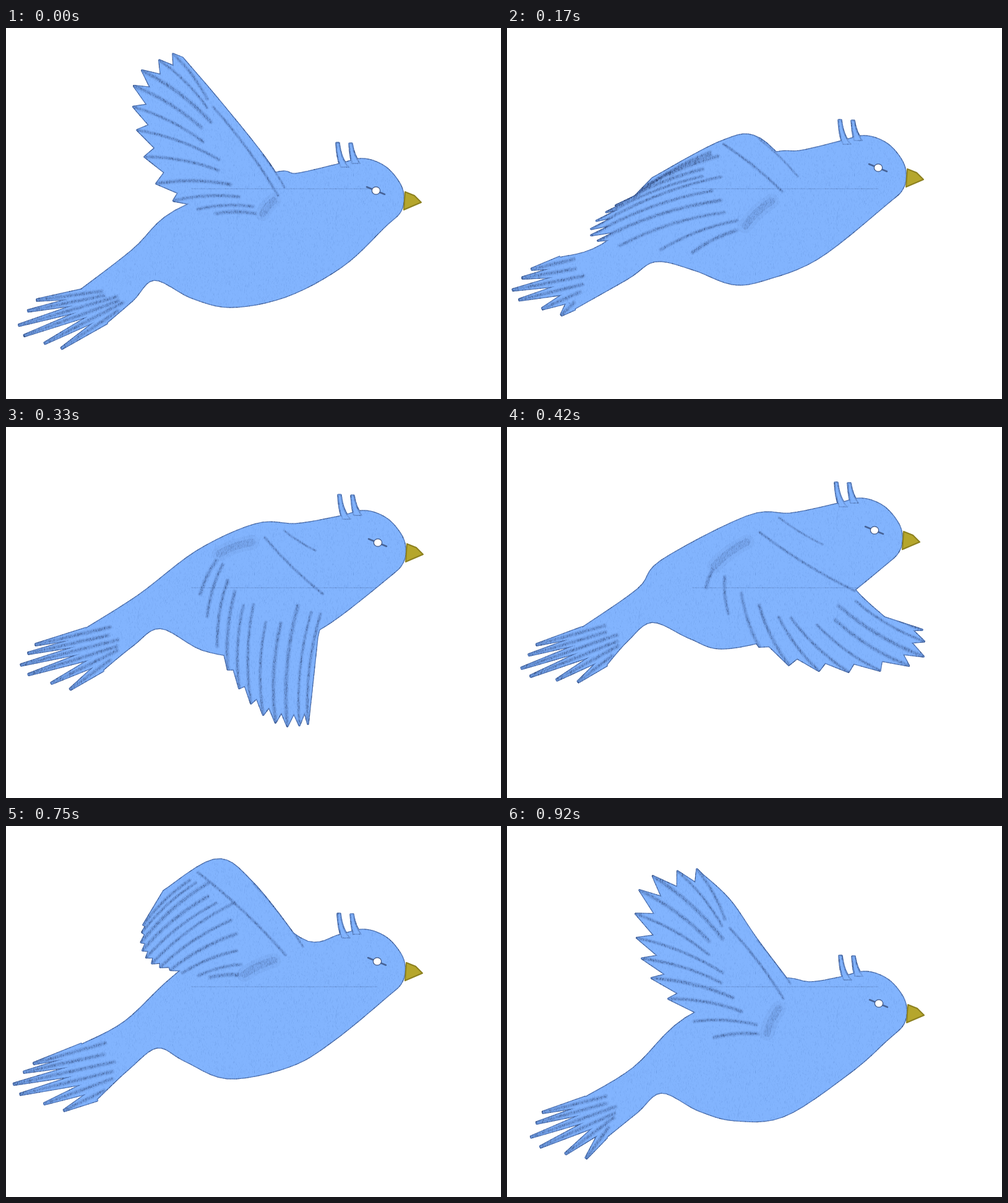
An HTML page with a canvas that plays this animation: 800x600 px, repeating every 1010 ms.

```html
<!DOCTYPE html>
<html lang="en">
<head>
<meta charset="utf-8">
<title>Flying bird</title>
<style>
html, body { margin: 0; width: 100%; height: 100%; overflow: hidden; background: #fff; }
canvas { display: block; width: 800px; height: 600px; }
</style>
</head>
<body>
<canvas id="stage" width="800" height="600"></canvas>
<script>
const W = 800, H = 600, LOOP = 1010;
const BLUE = '#82b4fe';
const FEATHERS = 11, TAIL_FEATHERS = 6;
const stage = document.getElementById('stage').getContext('2d');

// The head keeps its shape and travels with the eye.
const HEAD = [[-62, -42], [-22, -51], [12, -40], [35, -16], [44, 8], [39, 34], [14, 58]];
const BEAK = [[47, 2], [62, 8], [73, 19], [45, 31]];
const QUILLS = [[[-62, -77], [-51, -42]], [[-41, -76], [-33, -48]]];

// Key curves of each wing position. Feathers run from rim to shaft;
// cut is how deep the notches between them go.
const poses = [
  {
    eye: [598, 263], cut: 0.16,
    back: [[118, 426], [205, 359], [275, 295], [430, 236], [470, 236]],
    belly: [[545, 384], [455, 433], [365, 451], [300, 436], [240, 407], [205, 440], [163, 476]],
    tail: [[50, 440], [21, 490], [90, 518]],
    lead: [[450, 258], [415, 205], [345, 118], [285, 48]],
    rim: [[270, 42], [211, 80], [212, 165], [255, 268], [340, 300]],
    shaft: [[335, 128], [350, 215], [415, 300]]
  },
  {
    eye: [600, 226], cut: 0.16,
    back: [[85, 372], [155, 350], [270, 260], [420, 205], [475, 199]],
    belly: [[505, 371], [420, 406], [365, 414], [300, 390], [240, 377], [195, 405], [105, 456]],
    tail: [[40, 390], [10, 432], [88, 464]],
    lead: [[470, 240], [405, 177], [345, 184], [235, 243]],
    rim: [[205, 274], [168, 292], [136, 325], [160, 348], [300, 363]],
    shaft: [[350, 188], [355, 237], [385, 320]]
  },
  {
    eye: [601, 187], cut: 0.1,
    back: [[128, 327], [215, 272], [310, 200], [405, 157], [470, 157]],
    belly: [[530, 312], [470, 345], [400, 370], [320, 361], [250, 325], [205, 353], [155, 394]],
    tail: [[48, 352], [26, 393], [104, 424]],
    lead: [[450, 168], [500, 200], [516, 270], [503, 340]],
    rim: [[488, 480], [445, 482], [396, 447], [350, 375], [314, 270]],
    shaft: [[512, 270], [400, 280], [345, 205]]
  },
  {
    eye: [594, 167], cut: 0.14,
    back: [[120, 326], [212, 262], [250, 216], [390, 144], [460, 140]],
    belly: [[530, 287], [450, 335], [350, 358], [295, 341], [235, 315], [195, 345], [160, 385]],
    tail: [[48, 352], [26, 398], [115, 412]],
    lead: [[440, 147], [510, 190], [562, 263], [610, 308]],
    rim: [[671, 328], [665, 380], [552, 396], [432, 374], [322, 260]],
    shaft: [[562, 265], [455, 305], [335, 225]]
  },
  {
    eye: [599, 192], cut: 0.1,
    back: [[105, 339], [205, 272], [280, 200], [400, 130], [485, 146]],
    belly: [[535, 310], [440, 361], [350, 377], [300, 360], [240, 329], [200, 353], [150, 393]],
    tail: [[72, 344], [23, 397], [96, 425]],
    lead: [[495, 180], [435, 104], [385, 107], [290, 160]],
    rim: [[270, 195], [222, 242], [275, 300], [372, 312], [425, 280]],
    shaft: [[330, 150], [350, 195], [465, 185]]
  },
  {
    eye: [600, 219], cut: 0.05,
    back: [[122, 354], [193, 316], [275, 240], [400, 150], [490, 188]],
    belly: [[530, 346], [460, 388], [360, 408], [290, 380], [245, 358], [200, 391], [145, 443]],
    tail: [[45, 384], [13, 426], [94, 460]],
    lead: [[480, 195], [400, 93], [340, 54], [255, 105]],
    rim: [[222, 160], [219, 195], [236, 222], [275, 235], [330, 245]],
    shaft: [[310, 75], [375, 120], [385, 240]]
  },
  {
    eye: [601, 287], cut: 0.2,
    back: [[125, 440], [205, 391], [290, 310], [430, 250], [490, 253]],
    belly: [[555, 398], [450, 468], [370, 476], [310, 460], [250, 431], [210, 463], [158, 505]],
    tail: [[58, 463], [42, 512], [128, 537]],
    lead: [[458, 255], [405, 185], [360, 120], [315, 78]],
    rim: [[307, 70], [222, 90], [210, 181], [245, 262], [335, 342]],
    shaft: [[360, 165], [355, 240], [420, 335]]
  }
];

// A whole step is a pose, a half step lies midway between two.
const steps = [0, 0.5, 1, 1.5, 2, 3, 3.5, 4, 4.5, 5, 5.5, 6];
const starts = [0, 80, 170, 250, 330, 420, 500, 580, 670, 750, 840, 920];

let seed = 7;
function rnd() {
  seed = (seed * 1664525 + 1013904223) >>> 0;
  return seed / 4294967296;
}

// Blends numbers, points and lists of points alike.
function mix(a, b, k) {
  return Array.isArray(a) ? a.map((v, i) => mix(v, b[i], k)) : a + (b - a) * k;
}

function poseAt(step) {
  const a = poses[Math.floor(step)], b = poses[Math.ceil(step)];
  const out = {};
  for (const key in a) out[key] = mix(a[key], b[key], step % 1);
  return out;
}

// Catmull-Rom curve through pts, sampled at n evenly spaced parameters.
function spline(pts, n) {
  const last = pts.length - 1;
  const at = i => pts[Math.max(0, Math.min(last, i))];
  return Array.from({ length: n }, (_, k) => {
    const u = k / (n - 1) * last, i = Math.min(last - 1, Math.floor(u)), t = u - i;
    return [0, 1].map(c => {
      const [p, q, r, s] = [at(i - 1)[c], at(i)[c], at(i + 1)[c], at(i + 2)[c]];
      return q + t / 2 * (r - p + t * (2 * p - 5 * q + 4 * r - s + t * (3 * (q - r) + s - p)));
    });
  });
}

function polygon(pts) {
  const p = new Path2D();
  for (const [x, y] of pts) p.lineTo(x, y);
  p.closePath();
  return p;
}

// Line from a to b, bent sideways by a share of its length.
function bow([ax, ay], [bx, by], bend = 0) {
  const p = new Path2D();
  p.moveTo(ax, ay);
  p.quadraticCurveTo((ax + bx) / 2 + (by - ay) * bend, (ay + by) / 2 - (bx - ax) * bend, bx, by);
  return p;
}

function quill([tx, ty], [bx, by]) {
  const p = new Path2D();
  p.moveTo(tx - 2, ty);
  p.quadraticCurveTo(tx - 1, by - 12, bx - 6, by + 4);
  p.lineTo(bx + 7, by + 4);
  p.quadraticCurveTo(tx + 5, by - 8, tx + 2, ty);
  p.closePath();
  return p;
}

function taper([ax, ay], [bx, by], half) {
  const len = Math.hypot(bx - ax, by - ay);
  const nx = (ay - by) / len, ny = (bx - ax) / len;
  return polygon([
    [ax + nx * half, ay + ny * half], [bx + nx, by + ny],
    [bx - nx, by - ny], [ax - nx * half, ay - ny * half]]);
}

function layer(w, h) {
  const c = document.createElement('canvas');
  c.width = w;
  c.height = h;
  return c.getContext('2d');
}

// Paper grain: short upright flecks over a flat tint.
function grain(tint, fleck, count, strength) {
  const g = layer(160, 160);
  g.fillStyle = tint;
  g.fillRect(0, 0, 160, 160);
  g.fillStyle = fleck;
  for (let i = 0; i < count; i++) {
    g.globalAlpha = rnd() * strength;
    g.fillRect(Math.floor(rnd() * 160), Math.floor(rnd() * 160), 1, 1 + Math.floor(rnd() * 4));
  }
  return g.createPattern(g.canvas, 'repeat');
}
const paper = grain('rgba(0,0,0,0)', '#4f7cc4', 3500, 0.14);
const pencil = grain('rgba(62,94,152,.38)', '#1f3058', 8000, 0.45);

function drawBird(step) {
  seed = 11;
  const { eye, cut, back, belly, tail, lead, rim, shaft } = poseAt(step);
  const g = layer(W, H);
  const ink = (path, style, width, alpha = 1) => {
    g.globalAlpha = alpha;
    g.strokeStyle = style;
    g.lineWidth = width;
    g.stroke(path);
    g.globalAlpha = 1;
  };
  const shade = (path, width, alpha) => {
    ink(path, pencil, width * 2, alpha * 0.4);
    ink(path, pencil, width, alpha);
  };
  const byEye = ([x, y]) => [eye[0] + x, eye[1] + y];
  g.lineJoin = g.lineCap = 'round';

  const body = spline([...back, ...HEAD.map(byEye), ...belly], 110);

  const tips = spline(rim, FEATHERS), roots = spline(shaft, FEATHERS);
  const wing = [...spline(lead, 20)];
  tips.forEach((tip, i) => {
    if (i) wing.push(mix(mix(tips[i - 1], tip, 0.5), roots[i], cut));
    wing.push(tip);
  });
  wing.push(shaft[2]);

  // Tail feathers fan out from the cut end of the body.
  const top = back[0], bottom = belly[belly.length - 1];
  const gap = Math.hypot(bottom[0] - top[0], bottom[1] - top[1]) / TAIL_FEATHERS;
  const fan = spline(tail, TAIL_FEATHERS).map((tip, i) =>
    [mix(top, bottom, (i + 0.5) / TAIL_FEATHERS), tip]);

  const quills = QUILLS.map(q => quill(...q.map(byEye)));
  const shapes = [polygon(body), polygon(wing), ...quills,
    ...fan.map(([base, tip]) => taper(base, tip, gap * 0.62))];

  // Outlines first, so that only the outer edge stays visible.
  for (const s of shapes) {
    ink(s, '#6890d2', 3.5);
    ink(s, pencil, 3.5);
  }
  g.fillStyle = g.strokeStyle = BLUE;
  for (const s of shapes) {
    g.fill(s);
    ink(s, BLUE, 1);
  }

  g.globalCompositeOperation = 'source-atop';
  g.fillStyle = paper;
  g.fillRect(0, 0, W, H);
  ink(bow([300, 260], [600, 260]), pencil, 2, 0.3);

  tips.forEach((tip, i) => {
    const inner = mix(tip, roots[i], 0.8 + rnd() * 0.2);
    shade(bow(tip, inner, 0.09), 3 + rnd() * 1.5, 0.6);
  });
  shade(bow(shaft[0], mix(lead[0], shaft[2], 0.3), 0.05), 3, 0.6);
  shade(bow(lead[0], lead[1], -0.05), 2.5, 0.5);
  shade(bow(shaft[2], mix(shaft[2], lead[0], 0.5), 0.1), 12, 0.3);
  for (const [base, tip] of fan)
    shade(bow(tip, mix(base, tip, -0.3 - rnd() * 0.2)), 4, 0.6);
  for (const q of quills) ink(q, pencil, 2, 0.6);
  g.globalCompositeOperation = 'source-over';

  ink(bow(byEye([-15, -6]), byEye([14, 6])), '#3d5585', 2.5, 0.85);
  const ball = new Path2D();
  ball.ellipse(...eye, 6, 5.5, 0, 0, 7);
  ink(ball, '#3d5585', 2.5);
  g.fillStyle = '#fff';
  g.fill(ball);

  const beak = polygon(BEAK.map(byEye));
  g.fillStyle = '#b5a62c';
  g.fill(beak);
  ink(beak, '#8c801f', 2);
  return g.canvas;
}

const cache = [];
const t0 = performance.now();
let shown = -1;
function tick() {
  const t = (performance.now() - t0) % LOOP;
  const i = starts.filter(s => s <= t).length - 1;
  if (i !== shown) {
    cache[i] = cache[i] || drawBird(steps[i]);
    stage.fillStyle = '#fff';
    stage.fillRect(0, 0, W, H);
    stage.drawImage(cache[i], 0, 0);
    shown = i;
  }
  requestAnimationFrame(tick);
}
tick();
</script>
</body>
</html>
```
